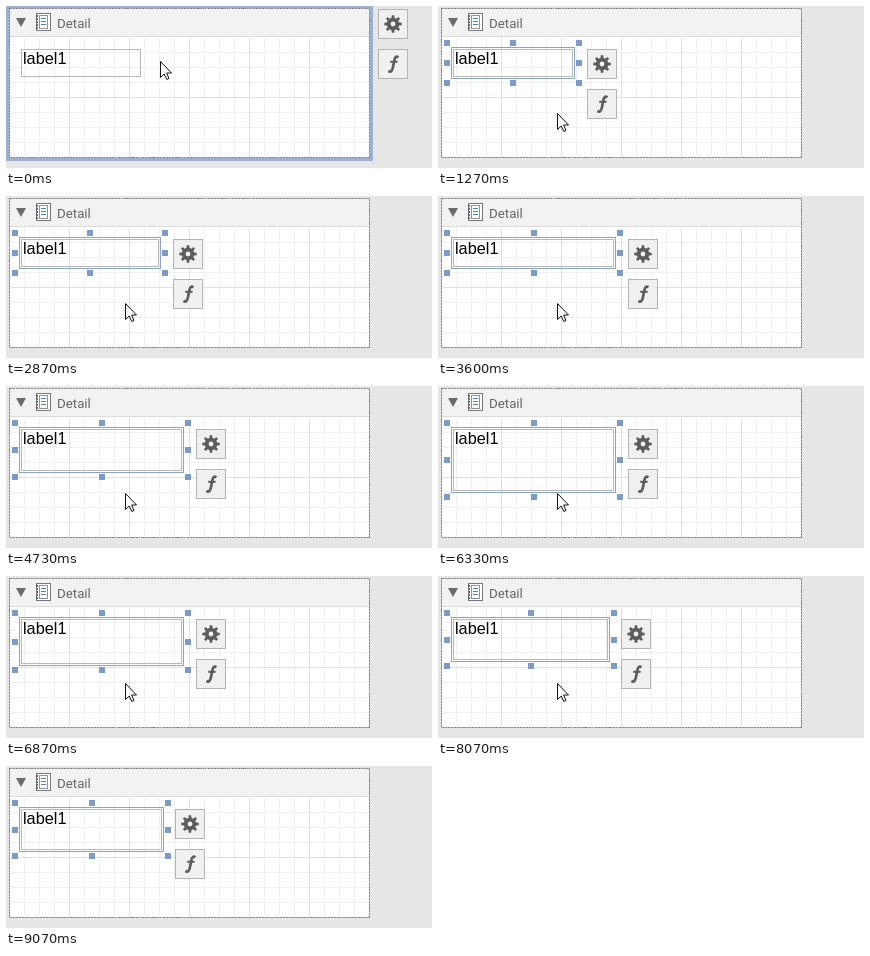
These frames come from a looping animation (426x162 px, 9.79 s). An HTML page:

```html
<!DOCTYPE html>
<html lang="en">
<head>
<meta charset="utf-8">
<title>Label resize</title>
<style>
  html, body { margin: 0; width: 100%; height: 100%; overflow: hidden; background: #e6e6e6; }
  svg { display: block; width: 426px; height: 162px; }
  .crisp { shape-rendering: crispEdges; }
  .title { font: 13.3px Roboto, sans-serif; fill: #666; }
  .text { font: 16.3px "Liberation Sans", Arial, sans-serif; fill: #000; }
  .handle { fill: #7b9bcb; }
  .button { fill: #f0f0f0; stroke: #b4b4b4; }
  .icon { fill: #5c5c5c; }
</style>
</head>
<body>
<svg viewBox="0 0 426 162">
  <defs>
    <pattern id="minor" x="3" y="31" width="15" height="15" patternUnits="userSpaceOnUse">
      <path d="M0 .5H15M.5 0V15" stroke="#f0f0f0"/>
    </pattern>
    <pattern id="major" x="3" y="31" width="60" height="60" patternUnits="userSpaceOnUse">
      <path d="M0 .5H60M.5 0V60" stroke="#e0e0e0"/>
    </pattern>
  </defs>

  <g class="crisp">
    <rect id="bandFrame" width="367" height="155" fill="#9cb0d2"/>
    <rect x="3" y="2" width="361" height="150" fill="#fff"/>
    <rect x="4" y="32" width="359" height="119" fill="url(#minor)"/>
    <rect x="4" y="32" width="359" height="119" fill="url(#major)"/>
    <rect x="4" y="3" width="359" height="27" fill="#f2f2f2"/>
    <path d="M4 30.5H363" stroke="#dcdcdc"/>
    <g fill="none">
      <rect x="3.5" y="2.5" width="360" height="149" stroke="#c4c4c4"/>
      <rect x="3.5" y="2.5" width="360" height="149" stroke="#8a8a8a" stroke-dasharray="2 1"/>
    </g>
  </g>

  <path d="M10 12H20L15 21Z" fill="#6a6a6a"/>
  <g class="crisp" fill="none">
    <rect x="30.5" y="7.5" width="14" height="17" fill="#fff" stroke="#777"/>
    <path d="M30.5 9V24" stroke="#666" stroke-width="2" stroke-dasharray="2 1"/>
    <rect x="33.5" y="9.5" width="8" height="13" fill="#fff" stroke="#8c9298"/>
    <path d="M35 12.5H40M35 15.5H40M35 18.5H40" stroke="#4a82bd"/>
  </g>
  <text class="title" x="51" y="22">Detail</text>

  <g class="crisp" fill="none">
    <rect id="outer" x="13.5" y="41.5" stroke="#8ba3c7"/>
    <rect id="inner" x="15.5" y="43.5" stroke="#b8b8b8"/>
  </g>
  <text class="text" x="17" y="58">label1</text>
  <g id="handles" class="crisp"></g>

  <g id="buttons">
    <rect class="button crisp" x=".5" y=".5" width="29" height="29"/>
    <rect class="button crisp" x=".5" y="40.5" width="29" height="29"/>
    <path id="gear" class="icon" fill-rule="evenodd" transform="translate(15 15)"/>
    <g transform="translate(15 55)" fill="none" stroke="#5c5c5c">
      <path d="M5.4-6.6C3-8.4 1.9-6.6 1.3-3.4L-.1 3.6C-.8 7.2-2.2 8.4-4.6 7" stroke-width="2.7"/>
      <path d="M-2.8-2.2H4.6" stroke-width="2"/>
    </g>
  </g>

  <path id="cursor" d="M.5.5V16.5L4.2 13L6.8 18.5L9 17.5L6.6 12H11.5Z" fill="#fff" stroke="#111"/>
</svg>
<script>
const LOOP = 9790;
const TICK = 1000 / 15;
const SELECT_AT = 650;
const REPEAT_SPEED = 0.031; // px per ms while a key is held

// Key presses: time, new growth, growth at which the held key is released
const widthKeys = [[0, 0], [1930, 1], [2470, 6, 41], [7470, 40], [7930, 38.6, 20.6]];
const heightKeys = [[0, 0], [3870, 1], [4330, 2], [4470, 6, 37], [5800, 36], [6270, 35, 13]];

// Pointer moves: start time, end time, start point, end point
const moves = [
  [0, 270, [154, 55], [106, 53]],
  [1000, 1270, [106, 53], [119, 107]],
  [8930, 9070, [119, 107], [86, 180]]
];

const $ = id => document.getElementById(id);
const set = (el, attrs) => Object.entries(attrs).forEach(([k, v]) => el.setAttribute(k, v));
const move = (el, x, y) => el.setAttribute("transform", `translate(${x} ${y})`);
const rowAt = (rows, t) => rows.findLast(row => row[0] <= t);
const smooth = p => p * p * (3 - 2 * p);

function growth(keys, t) {
  const [from, value, limit = value] = rowAt(keys, t);
  const travel = Math.floor((t - from) * REPEAT_SPEED);
  return value + Math.sign(limit - value) * Math.min(travel, Math.abs(limit - value));
}

function pointer(t) {
  const [from, to, a, b] = rowAt(moves, t);
  const p = smooth(Math.min(1, (t - from) / (to - from)));
  return a.map((v, i) => Math.round(v + (b[i] - v) * p));
}

function gearPath(teeth) {
  const points = [];
  for (let i = 0; i < teeth; i++) {
    for (const [turn, r] of [[-.29, 6.3], [-.19, 8.8], [.19, 8.8], [.29, 6.3]]) {
      const a = (i + turn) * 2 * Math.PI / teeth;
      points.push(`${(r * Math.cos(a)).toFixed(2)} ${(r * Math.sin(a)).toFixed(2)}`);
    }
  }
  return `M${points.join("L")}ZM2.4 0A2.4 2.4 0 1 0-2.4 0A2.4 2.4 0 1 0 2.4 0Z`;
}

$("gear").setAttribute("d", gearPath(8));

const handles = Array.from({ length: 8 }, () => {
  const el = document.createElementNS("http://www.w3.org/2000/svg", "rect");
  set(el, { class: "handle", width: 6, height: 6 });
  return $("handles").appendChild(el);
});

function draw(time) {
  // The picture updates 15 times a second, on times rounded to 10 ms
  const tick = Math.floor((time % LOOP + 4) / TICK);
  const t = Math.round(tick * TICK / 10) * 10;
  const grown = growth(widthKeys, t);
  const w = Math.round(grown);
  const h = growth(heightKeys, t);
  const selected = t >= SELECT_AT;

  $("bandFrame").style.display = selected ? "none" : "";
  $("outer").style.display = $("handles").style.display = selected ? "" : "none";
  set($("outer"), { width: 123 + w, height: 31 + h });
  set($("inner"), { width: 119 + w, height: 27 + h });

  const xs = [6, 72 + Math.ceil(w / 2), 138 + w];
  const ys = [34, 54 + Math.ceil(h / 2), 74 + h];
  handles.forEach((el, i) => {
    const cell = i < 4 ? i : i + 1;
    set(el, { x: xs[cell % 3], y: ys[Math.floor(cell / 3)] });
  });

  if (selected) move($("buttons"), 149 + Math.floor(grown), 43);
  else move($("buttons"), 372, 3);
  move($("cursor"), ...pointer(t));
}

const start = performance.now();
function frame() {
  draw(performance.now() - start);
  requestAnimationFrame(frame);
}
frame();
</script>
</body>
</html>
```
